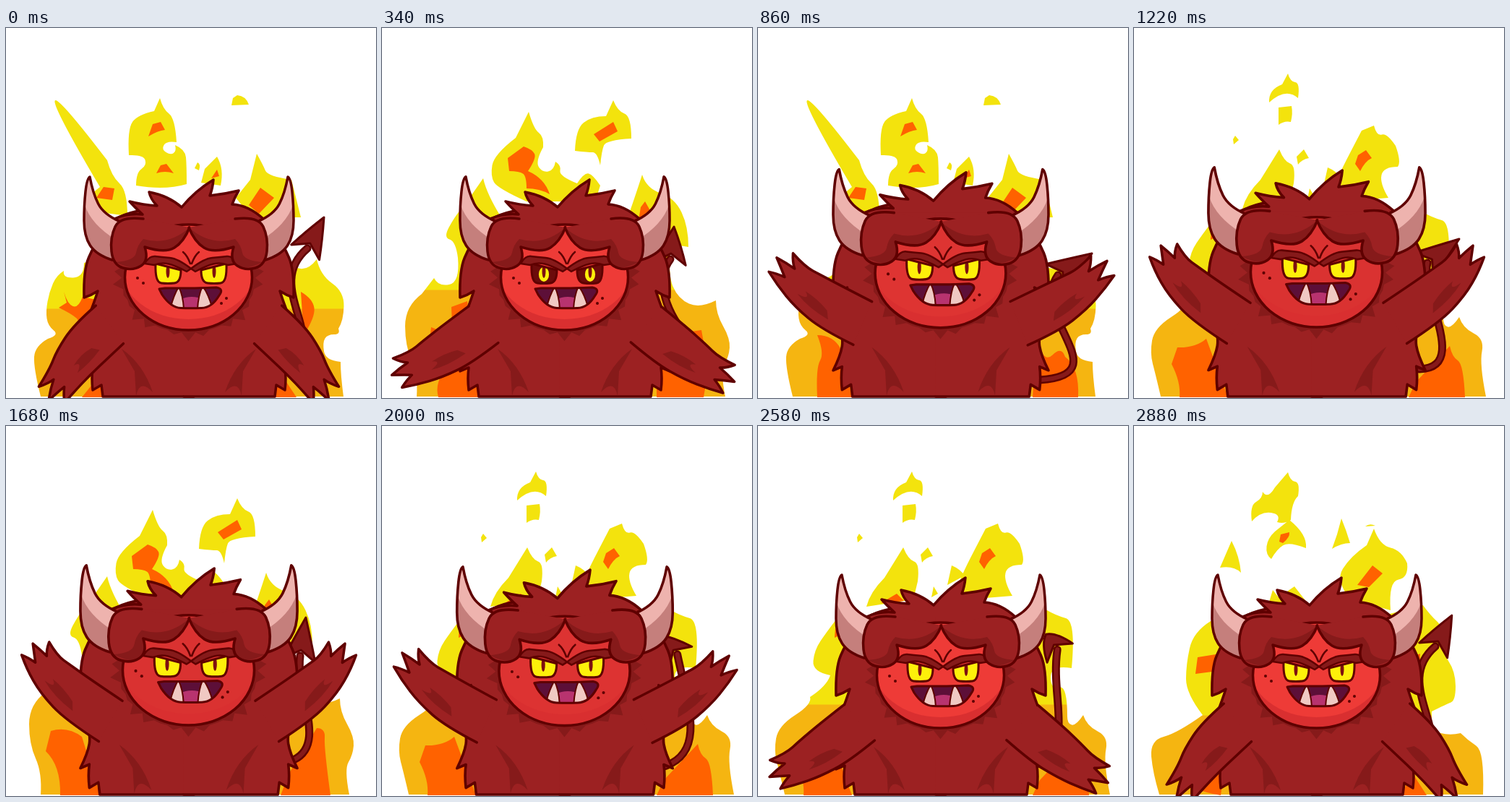
Write an HTML page with a canvas that moves like this. It is 512x512 px and loops after 2.9 s.

```html
<!DOCTYPE html>
<html>
<head>
<meta charset="utf-8">
<style>
html, body { margin: 0; height: 100%; overflow: hidden; background: #fff; }
canvas { display: block; width: 100vw; height: 100vh; }
</style>
</head>
<body>
<canvas id="stage" width="512" height="512"></canvas>
<script>
const ctx = document.getElementById('stage').getContext('2d');
const LOOP = 2900;
const LINE = '#5f0000', FUR = '#9c2122', DARK = '#861a1a';
const YELLOW = '#f3e30d', AMBER = '#f5b511', ORANGE = '#ff6200';

// Points are "x,y"; "!" marks a sharp corner, the others steer a curve.
const parse = text => text.split(' ').map(word =>
  [...word.replace('!', '').split(',').map(Number), word.endsWith('!')]);

function trace(pts, open, path = new Path2D()) {
  path.moveTo(pts[0][0], pts[0][1]);
  for (let i = 1; i < pts.length; i++) {
    const [x, y, sharp] = pts[i], next = pts[(i + 1) % pts.length];
    if (sharp) path.lineTo(x, y);
    else if (next[2]) path.quadraticCurveTo(x, y, next[0], next[1]);
    else path.quadraticCurveTo(x, y, (x + next[0]) / 2, (y + next[1]) / 2);
  }
  if (!open) path.closePath();
  return path;
}

const outline = text => trace(parse(text), true);

function blobs(text) {
  const path = new Path2D();
  text.split('|').forEach(part => trace(parse(part), false, path));
  return path;
}

function paint(path, fill, width, color = LINE) {
  if (fill) { ctx.fillStyle = fill; ctx.fill(path); }
  if (width) { ctx.lineWidth = width; ctx.strokeStyle = color; ctx.stroke(path); }
}

function oval(x, y, rx, ry) {
  const path = new Path2D();
  path.ellipse(x, y, rx, ry, 0, 0, 7);
  return path;
}

function both(axis, draw) {
  draw(0);
  ctx.save();
  ctx.translate(2 * axis, 0);
  ctx.scale(-1, 1);
  draw(1);
  ctx.restore();
}

function smooth(from, to, t) {
  const x = Math.min(1, Math.max(0, (t - from) / (to - from)));
  return x * x * (3 - 2 * x);
}

// Smooth interpolation through rows of [time, ...values].
function pose(keys, t) {
  const last = keys.length - 1;
  if (t <= keys[0][0]) return keys[0].slice(1);
  if (t >= keys[last][0]) return keys[last].slice(1);
  const i = keys.findIndex(k => k[0] > t) - 1;
  const a = keys[i], b = keys[i + 1], span = b[0] - a[0], x = (t - a[0]) / span;
  const slope = (n, j) => n < 1 || n >= last ? 0 :
    (keys[n + 1][j] - keys[n - 1][j]) / (keys[n + 1][0] - keys[n - 1][0]) * span;
  const s = x * x * (3 - 2 * x);
  return a.slice(1).map((v, k) => v + (b[k + 1] - v) * s +
    x * (1 - x) * (1 - x) * slope(i, k + 1) - x * x * (1 - x) * slope(i + 1, k + 1));
}

// ---- fire ----
const flames = [
  [388, '108,510! 48,510! 38,470 40,440 58,430! 74,425 58,412 55,392 60,365 70,342 80,336! 78,346 108,345 108,325! 200,300! 398,330! 415,340 430,320! 435,342 468,365 467,405 460,416! 463,424 445,424 438,435 442,460 463,462! 463,480 467,510!' +
    '|213,97! 217,112 234,125 236,158! 222,156 215,168 228,176 236,170 234,162! 248,168 250,190 250,216! 220,225 180,218! 180,200 195,190 190,175 170,176! 168,140 182,120 205,115!' +
    '|140,183! 146,205 168,225 168,260! 107,252! 110,235 130,220! |292,178! 302,195 297,218! 270,214! 275,195!|265,186! 270,188 267,197! 261,194!' +
    '|347,174! 356,190 362,205 395,210! 408,262! 340,262! 318,235! 338,210!|320,93! 332,94 336,106! 312,107! 314,97!'.replace(/! \|/g, '!|'),
    '150,222! 147,238! 125,235! 135,220!|214,130! 220,141! 210,142 197,150! 203,133!|222,188! 232,201! 220,197 208,201! 214,190!|352,221! 371,235! 350,257! 336,245!|292,196! 295,205! 284,208!'],
  [362, '48,510! 50,480 32,440 32,385 55,368! 72,346! 78,358 108,352 105,318! 102,295 85,290 100,262 118,240 140,208! 145,230 165,262! 340,262! 348,240 360,203! 366,222 405,235 424,275 424,303! 408,300 400,300! 395,340 410,375 440,388 462,377! 462,395 482,430 480,455 468,475 475,510!' +
    '|203,116! 210,140 224,150 223,165! 212,185 222,200 238,197 240,185! 248,190 245,205 270,215! 280,200 292,203 302,218! 295,240! 200,240! 160,222 150,205 155,175 185,152!' +
    '|320,100! 326,115 345,122 345,153! 310,155 304,170 302,190! 298,172 285,172 267,170! 268,140 290,122 310,122!',
    '196,164! 208,168 214,180 202,198! 225,208 232,230! 218,222 200,222! 200,205 190,198 176,198! 174,180!|320,130! 326,143! 301,157! 293,147!|364,240! 373,256! 355,266! 358,248!'],
  [385, '37,510! 30,480 22,450 28,415 75,385 72,375! 95,360 100,345! 75,340 78,310 95,285 108,268! 200,300! 400,255! 412,262 440,270 434,335! 405,330 405,365 428,358 428,402! 428,412 440,415 450,400! 455,415 485,430 478,465 487,510!' +
    '|213,63! 216,74 230,76 227,97! 210,82 187,103! 186,85 205,78!|218,108! 220,118 217,130! 208,128 200,134! 200,110!|140,149! 145,155! 138,161! 137,154!|235,168! 242,180! 232,182 227,189! 225,178!' +
    '|201,168! 208,185 224,190 221,215! 215,240! 150,250! 155,230 175,210!|332,135! 336,150 350,145 362,163! 370,185 365,192! 345,192 340,215 352,235! 290,240! 275,225 285,200 303,165 315,142!|268,193! 280,198 286,207! 262,220!|243,222! 249,232! 240,237!',
    '321,169! 329,180! 320,184 313,198! 306,188! 310,176!|192,232! 202,242! 170,245!|107,279! 112,290! 106,293!'],
  [400, '35,510! 26,480 22,435 60,425 95,400! 72,370 72,330 82,285 106,270! 200,300! 400,248! 410,262 430,280 425,310 445,340 445,380 432,385 412,395! 412,420! 430,430 452,425! 462,435 485,450 483,510!' +
    '|213,64! 216,76 230,78 227,97! 218,105 217,130! 208,136 198,133! 204,122 175,118 163,132! 160,110 178,100 178,91! 185,102 195,85!|215,130! 240,150 238,169! 215,160 198,170 190,184! 182,178 185,155 195,146!' +
    '|287,128! 294,145 299,162! 287,162 274,170! 281,150!|135,159! 146,180 148,203! 138,193 119,196!|332,142! 340,165 370,172 378,190! 380,210 352,215 355,255! 300,240! 278,215 300,180 322,165!|320,139! 326,134 334,138!|192,227! 200,237! 222,222! 240,245! 185,250!',
    '215,147! 216,154 206,162! 201,160! 203,150!|330,193! 344,204! 325,223! 309,220!|88,320! 113,316! 108,340! 85,343!|383,320! 396,315! 395,348!']
].map(([split, body, spots]) => {
  const fill = ctx.createLinearGradient(0, split, 0, split + 1);
  fill.addColorStop(0, YELLOW);
  fill.addColorStop(1, AMBER);
  return { fill, body: blobs(body), spots: blobs(spots) };
});

const embers = [
  '80,365! 85,382 100,388 106,372! 125,376! 112,405 92,430! 105,408 90,395 73,387! 84,380!|408,365! 425,375 428,400 412,425!|105,511! 130,480! 150,511!|380,478! 402,511! 370,511!',
  '62,422! 85,415 105,430! 130,511! 75,511! 76,470 55,450!|392,480! 430,418! 442,418 440,445 449,511! 380,511!',
  '60,442! 85,443 100,430! 130,511! 63,511! 65,490 52,465!|390,490! 437,440! 440,455 456,465 458,511! 380,511!',
  '98,412! 72,440 64,460 62,485! 80,505 120,511! 130,440!|385,480! 405,511! 370,511!',
  '82,511! 80,470 92,450 82,425! 105,425 115,445! 130,511!|385,430! 395,465 420,440 425,455! 445,470 443,511! 380,511!',
  '96,386! 118,378! 120,396! 97,411!|68,414! 78,418! 66,432!|78,511! 72,490 90,470! 140,460! 140,511!|428,420! 442,418! 446,440!|380,470! 450,482! 445,511! 380,511!'
].map(blobs);
const emberOrder = [0, 1, 2, 3, 4, 5, 2, 3];

function drawFire(t) {
  const step = Math.floor(t * 3 / 200), flame = flames[step % 4];
  paint(flame.body, flame.fill);
  paint(flame.spots, ORANGE);
  paint(embers[emberOrder[step % 8]], ORANGE);
}

// ---- tail: time, four curve points, arrow tip ----
const tailKeys = [
  [0, 412, 437, 412, 395, 370, 345, 417, 305, 440, 262],
  [340, 420, 425, 388, 385, 380, 345, 399, 320, 404, 275],
  [860, 390, 487, 500, 480, 375, 400, 415, 342, 462, 312],
  [1220, 395, 472, 465, 470, 395, 370, 406, 325, 450, 292],
  [1680, 398, 462, 445, 440, 400, 370, 407, 318, 415, 265],
  [2320, 390, 475, 450, 455, 435, 390, 411, 314, 365, 308],
  [2900, 412, 437, 412, 395, 370, 345, 417, 305, 440, 262]
];

function drawTail(t) {
  const [ax, ay, bx, by, cx, cy, x, y, tipX, tipY] = pose(tailKeys, t);
  const rope = new Path2D();
  rope.moveTo(ax, ay);
  rope.bezierCurveTo(bx, by, cx, cy, x, y);
  paint(rope, null, 11);
  paint(rope, null, 6, DARK);
  const len = Math.hypot(tipX - x, tipY - y) || 1;
  const dx = (tipX - x) / len, dy = (tipY - y) / len;
  const at = (f, s, sharp) => [x + dx * f - dy * s, y + dy * f + dx * s, sharp];
  paint(trace([at(len, 0, true), at(20, 13), at(-6, 22, true), at(8, 0, true),
    at(-6, -22, true), at(20, -13)]), DARK, 3);
}

// ---- arms: time, shoulder, middle, fingertip ----
const armKeys = [
  [0, 143, 410, 100, 452, 62, 512],
  [340, 140, 410, 82, 450, 18, 480],
  [580, 145, 410, 75, 397, 5, 374],
  [860, 145, 408, 82, 372, 28, 322],
  [1220, 145, 408, 80, 360, 38, 305]
];
// Along the arm in hundredths, across it in pixels.
const armShape = parse('0,32! 30,32 60,27 78,21 96,22! 90,13 84,9! 94,6 103,1! 93,-4 85,-9! 93,-14 98,-20! 85,-24 60,-30 30,-34 0,-33!');
const armShade = parse('35,-8! 48,-2 62,-4! 52,-10 66,-14! 50,-20 30,-18!');

function drawArm(t) {
  const [sx, sy, mx, my, hx, hy] = pose(armKeys, t);
  const cx = 2 * mx - (sx + hx) / 2, cy = 2 * my - (sy + hy) / 2;
  const place = ([along, v, sharp]) => {
    const u = along / 100, w = 1 - u;
    const tx = w * (cx - sx) + u * (hx - cx), ty = w * (cy - sy) + u * (hy - cy);
    const n = v / Math.hypot(tx, ty);
    return [w * w * sx + 2 * w * u * cx + u * u * hx - ty * n,
            w * w * sy + 2 * w * u * cy + u * u * hy + tx * n, sharp];
  };
  paint(trace(armShape.map(place), true), FUR, 3.5);
  paint(trace(armShade.map(place)), DARK);
}

// ---- body and head ----
const bodyHalf = outline('260,250! 190,252! 150,258 122,300 107,335 108,373! 118,370 127,364! 122,380 114,400! 122,430 118,455 108,475! 120,470! 118,485 120,501! 132,494! 134,510! 260,510!');
const streak = blobs('160,444! 190,465 203,504! 185,485 180,509! 178,475!');
const horn = outline('147,321! 125,314 108,288 108,245 112,208 116,206! 120,228 135,258 158,268!');
const hornShade = blobs('147,321! 125,314 108,288 109,245! 118,272 152,293!');
const crown = outline('150,264! 168,256 189,258! 178,248 171,240! 190,245 209,246! 200,237 198,227! 225,232 243,248! 262,225 287,210! 286,222 282,232! 302,230 322,225! 316,235 313,244! 335,245 356,264!');
const bang = outline('254,276! 246,296 220,312 192,303! 198,322 176,336 148,328 144,290 158,260 190,264!');
const bangShade = blobs('254,276! 246,296 220,312 192,303! 198,322 176,336 152,324! 178,322 182,300 190,292! 225,302 254,276!');
const face = oval(252.5, 345, 88, 73), faceLight = oval(252.5, 330, 94, 73);
const eye = blobs('207,326! 206,352 224,354 242,352 242,335!');
const brow = blobs('192,326! 198,315 215,317 238,319 256,333! 250,337! 235,329 215,324 205,328!');
const wrinkle = outline('245,310! 251,315 255,326!');
const mouth = blobs('220,360! 245,360 265,360 291,359! 302,361 295,370! 285,387 256,388 228,387 216,369! 212,361!');
const tongue = oval(257, 385, 22, 13);
const teeth = blobs('228,386! 232,370 239,358! 245,370 246,389!|265,389! 266,370 272,357! 280,368 285,386!');

const mane = new Path2D();
for (let i = 0; i <= 34; i++) {
  const a = -0.2 + i / 34 * (Math.PI + 0.4);
  const r = i % 2 ? 1.13 + 0.08 * Math.sin(i * 2.3) : 1.05;
  mane.lineTo(252.5 + 88 * r * Math.cos(a), 345 + 73 * r * Math.sin(a));
}

function clipped(path, draw) {
  ctx.save();
  ctx.clip(path);
  draw();
  ctx.restore();
}

function drawFace(blink, lift) {
  paint(face, '#d92f30');
  clipped(face, () => paint(faceLight, `rgb(${238 - 20 * lift},${59 - 9 * lift},${55 - 6 * lift})`));
  paint(face, null, 3.5);
  both(256, () => {
    paint(eye, blink ? '#6c0b0b' : '#fdf00a');
    clipped(eye, () => {
      if (blink) paint(oval(224, 339 + 2 * blink, 18 - 11 * blink, 18 - 8 * blink), '#fdf00a');
      paint(oval(224, 337, 2.5, 9), '#7d1010');
    });
    paint(eye, null, 3);
    paint(brow, DARK, 2.5);
    paint(wrinkle, null, 2.5);
  });
  paint(mouth, '#5d0f38');
  clipped(mouth, () => {
    paint(tongue, '#b8336f');
    paint(teeth, '#f0c9c3', 2);
  });
  paint(mouth, null, 3);
  [[182, 346], [190, 353], [305, 374], [298, 381]].forEach(([x, y]) => paint(oval(x, y, 2, 2), LINE));
}

function drawBody() {
  both(253, () => paint(bodyHalf, FUR, 3.5));
  paint(mane, DARK);
  both(253, () => paint(streak, DARK));
}

function drawHead(blink, lift) {
  drawFace(blink, lift);
  paint(crown, FUR, 3.5);
  both(253, () => {
    paint(horn, '#eeb3ae');
    paint(hornShade, '#c57f7c');
    paint(horn, null, 3.5);
  });
  both(253.5, () => {
    paint(bang, FUR);
    paint(bangShade, DARK);
    paint(bang, null, 3.5);
  });
}

function stretched(lift, draw) {
  ctx.save();
  ctx.translate(253, 511);
  ctx.scale(1 + 0.035 * lift, 1 + 0.043 * lift);
  ctx.translate(-253, -511);
  draw();
  ctx.restore();
}

const start = performance.now();

function frame(now) {
  const t = Math.max(0, now - start) % LOOP;
  const rise = Math.min(t, LOOP - t);
  const lift = smooth(300, 1100, rise);
  const blink = Math.max(0, 1 - Math.abs(t - 340) / 120);
  ctx.lineJoin = ctx.lineCap = 'round';
  ctx.fillStyle = '#fff';
  ctx.fillRect(0, 0, 512, 512);
  drawFire(t);
  drawTail(t);
  stretched(lift, drawBody);
  both(253, side => drawArm(rise - 40 * side));
  stretched(lift, () => drawHead(blink, lift));
  requestAnimationFrame(frame);
}
requestAnimationFrame(frame);
</script>
</body>
</html>
```
